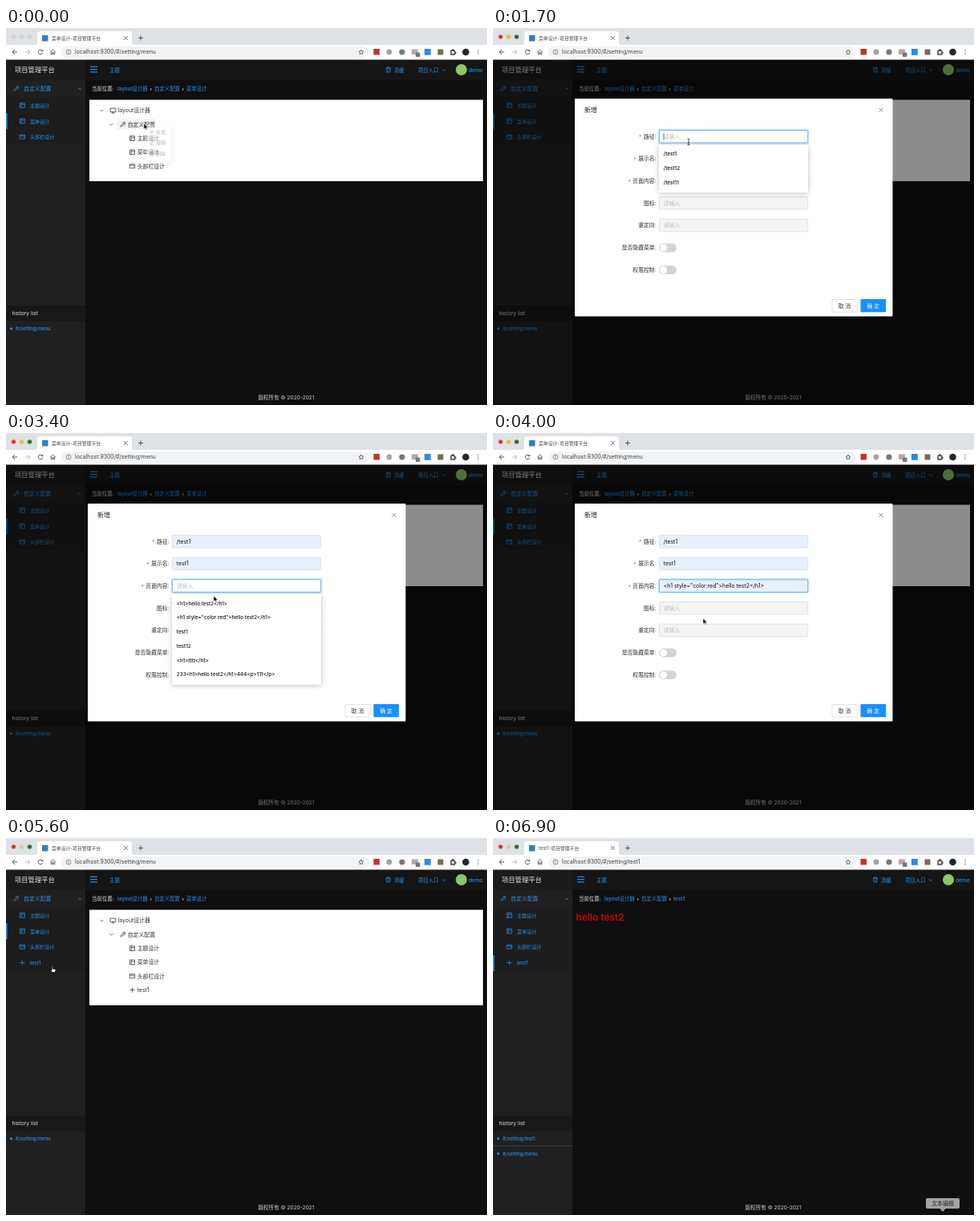
Write an HTML page that moves like this. It is 600 px wide and 470 px high and loops after 7 s.

```html
<!DOCTYPE html>
<html lang="zh">
<head>
<meta charset="utf-8">
<title>菜单设计</title>
<style>
  html, body { margin: 0; width: 100%; height: 100%; overflow: hidden; background: #0f0f0f; }
  svg { display: block; width: 600px; height: 470px; font-family: Inter, "Noto Sans CJK SC", "Noto Sans CJK", sans-serif; }
  text { white-space: pre; }
  .pop { filter: drop-shadow(0 1.5px 3px rgba(0, 0, 0, .25)); }
  .menu { filter: drop-shadow(2px 3px 5px rgba(0, 0, 0, .16)); }
</style>
</head>
<body>
<svg id="stage" viewBox="0 0 600 470"></svg>
<script>
const LOOP = 7000, STEP = 100;
const BLUE = '#2a90e8', INK = '#333', PALE = '#e4e4e4';

// [time, x, y, shape]
const MOVES = [
  [0, 172, 119, 'arrow'], [400, 172, 119, 'arrow'], [800, 195, 131, 'hand'], [1200, 195, 131, 'arrow'],
  [1500, 244, 142, 'beam'], [1800, 244, 142, 'arrow'], [2000, 232, 159, 'arrow'], [2100, 232, 159, 'arrow'],
  [2400, 240, 164, 'beam'], [2600, 240, 164, 'arrow'], [2800, 230, 187, 'arrow'], [2900, 230, 187, 'arrow'],
  [3100, 259, 192, 'beam'], [3200, 259, 192, 'arrow'], [3400, 259, 203, 'arrow'], [3800, 262, 231, 'arrow'],
  [4000, 262, 231, 'arrow'], [4600, 475, 346, 'hand'], [5000, 475, 346, 'arrow'], [5500, 58, 160, 'hand'],
  [6400, 58, 160, 'arrow'], [6900, 561, 476, 'arrow']
];

const FIELDS = [
  { label: '路径', y: 135.3, need: 1, focus: [1500, 2400], open: [1600, 2100], value: '/test1',
    list: ['/test1', '/test12', '/test11'], pick: 0, hover: 2000 },
  { label: '展示名', y: 163, need: 1, focus: [2400, 3100], open: [2500, 2900], value: 'test1',
    list: ['test1', 'test12', 'test11'], pick: 0, hover: 2700 },
  { label: '页面内容', y: 190.6, need: 1, focus: [3100, 5300], open: [3200, 4000], value: '<h1 style="color:red">hello test2</h1>',
    list: ['<h1>hello test2</h1>', '<h1 style="color:red">hello test2</h1>', 'test1', 'test12',
      '<h1>tttt</h1>', '233<h1>hello test2</h1>444<p>111</p>'], pick: 1, hover: 3700 },
  { label: '图标', y: 218.3 },
  { label: '重定向', y: 246 },
  { label: '是否隐藏菜单', y: 274, toggle: 1 },
  { label: '权限控制', y: 301.7, toggle: 1 }
];

const ICONS = {
  plus: 'M-3 0H3M0-3V3',
  cross: 'M-2.4-2.4L2.4 2.4M2.4-2.4L-2.4 2.4',
  down: 'M-2-1L0 1L2-1',
  up: 'M-2 1L0-1L2 1',
  monitor: 'M-3.4-2.8H3.4V1.6H-3.4ZM0 1.6V3M-2 3H2',
  wrench: 'M-3 2.2L.2-1A2 2 0 0 1 2.6-3L1.3-1.6L2-.8L3.2-2A2 2 0 0 1 1 .6L-2.2 3Z',
  layout: 'M-3-2.9H3V2.9H-3ZM-1.2-2.9V2.9M-1.2-.9H3',
  card: 'M-3.2-2.5H3.2V2.5H-3.2ZM-3.2-1H3.2M1 .8H2.2',
  pencil: 'M-2.5 1.6L-2.1-.2L1.4-3L2.6-1.6L-.8 1.4ZM-3 3H3',
  trash: 'M-3-2H3M-1-2V-3H1V-2M-2.3-2L-2 3H2L2.3-2M0-.6V1.6',
  back: 'M3 0H-3M0-3L-3 0L0 3',
  forward: 'M-3 0H3M0-3L3 0L0 3',
  reload: 'M2.4-1.6A2.8 2.8 0 1 0 2.8.8M2.8-3V-1.2H1',
  home: 'M-3.2 0L0-3L3.2 0M-2.2-.6V2.8H-.7V.6H.7V2.8H2.2V-.6',
  star: 'M0-3L.9-1L3-.8L1.4.6L1.9 2.8L0 1.7L-1.9 2.8L-1.4.6L-3-.8L-.9-1Z',
  puzzle: 'M-2.6-1.6H-.8A1 1 0 1 1 .8-1.6H2V0A1 1 0 1 1 2 1.6V3H-2.6V1.8A1 1 0 0 0-2.6 0Z'
};

const CURSORS = {
  arrow: '<path d="M0 0V7.2L1.7 5.7L2.9 8.3L4 7.8L2.9 5.3H5.2Z" fill="#000" stroke="#fff" stroke-width=".6"/>',
  hand: '<path d="M-.8 0Q0-.8.7 0V3L3.4 3.4Q4.2 3.7 4 4.8L3.4 7.6H-.3L-2.4 4.6Q-2.3 3.5-.8 4.6Z" fill="#fff" stroke="#000" stroke-width=".8"/>',
  beam: '<path d="M-1.5-4Q0-4 0-3Q0-4 1.5-4M0-3V3M-1.5 4Q0 4 0 3Q0 4 1.5 4M-.8.8H.8" fill="none" stroke="#222" stroke-width=".8"/>'
};

const clamp = v => Math.max(0, Math.min(1, v));
const within = (t, [a, b]) => t >= a && t < b;
const esc = s => s.replace(/&/g, '&amp;').replace(/</g, '&lt;');

const rect = (x, y, w, h, fill, more = '') =>
  `<rect x="${x}" y="${y}" width="${w}" height="${h}" fill="${fill}" ${more}/>`;
const dot = (x, y, r, fill, more = '') => `<circle cx="${x}" cy="${y}" r="${r}" fill="${fill}" ${more}/>`;
const text = (x, y, size, str, fill = INK, more = '') =>
  `<text x="${x}" y="${(y + size * .36).toFixed(2)}" font-size="${size}" fill="${fill}" ${more}>${esc(str)}</text>`;
const icon = (name, x, y, color = INK, width = .75) =>
  `<path transform="translate(${x} ${y})" d="${ICONS[name]}" fill="none" stroke="${color}" stroke-width="${width}"/>`;
const MEDIUM = 'font-weight="500"';

function browser(t, s) {
  const lights = s.idle ? ['#d2d4d7', '#d2d4d7', '#d2d4d7'] : ['#ee4d49', s.dim > .2 ? '#f2bd30' : '#dfc8a4', '#2f8a35'];
  let out = rect(0, 0, 600, 21, '#dee1e6') + rect(0, 21, 600, 18.5, '#fff');
  lights.forEach((c, i) => {
    out += dot(9.5 + i * 10, 11, 2.8, c);
    if (!s.idle && i !== 1) out += dot(9.5 + i * 10, 11, 1, '#5b1f16');
  });
  out += '<path d="M36 21Q39 21 39 18V7.5Q39 4 42 4H154Q157 4 157 7.5V18Q157 21 160 21Z" fill="#fff"/>'
    + rect(45, 9, 7.5, 7.5, '#2f7fc4')
    + text(57, 12.7, 5.85, (s.test ? 'test1' : '菜单设计') + '-项目管理平台', '#45484c')
    + icon('cross', 149.5, 12.5, '#444', .8) + icon('plus', 168, 12.5, '#444', .9)
    + icon('back', 11, 30, '#555', 1) + icon('forward', 27, 30, '#bbb', 1)
    + icon('reload', 43, 30, '#555', 1) + icon('home', 58.5, 30, '#555', .9)
    + rect(69, 23, 384, 14, '#f1f3f4', 'rx="7"')
    + dot(78, 30, 3, 'none', 'stroke="#666" stroke-width=".7"') + rect(77.6, 29.4, .8, 2.2, '#666') + rect(77.6, 28, .8, .8, '#666')
    + text(86, 30, 6.9, 'localhost:9300/#/setting/' + (s.test ? 'test1' : 'menu'), '#3c4043')
    + icon('star', 443, 30, '#555', .8)
    + rect(458.5, 26, 7.5, 7.5, '#c8322b') + dot(478, 30, 3.4, '#9aa5a5') + dot(494, 30, 3.6, '#777')
    + rect(506, 26.5, 8, 6.5, '#b9a7a6') + rect(511, 30.5, 5.5, 5.5, '#777', 'rx="1"')
    + rect(522, 26, 7.8, 7.8, '#2b8ce0') + rect(538.5, 26.5, 7, 7, '#776b55')
    + icon('puzzle', 557.5, 30, '#444', 1.3) + dot(573.5, 30, 4.3, '#20262b');
  for (const y of [27.5, 30, 32.5]) out += dot(589, y, .7, '#666');
  return out;
}

function sidebar(t, s) {
  const items = [['layout', '主题设计'], ['layout', '菜单设计'], ['card', '头部栏设计']];
  if (s.added) items.push(['plus', 'test1']);
  let out = rect(0, 39.5, 99, 431, '#202020') + rect(0, 39.5, 99, 25.5, '#1b1b1b')
    + text(11, 52, 8.3, '项目管理平台', PALE, MEDIUM)
    + icon('wrench', 12.5, 75.5, BLUE) + text(22, 75.5, 6.9, '自定义配置', BLUE) + icon('up', 92, 76, BLUE, .8)
    + rect(0, 86, 99, items.length * 19.8, '#1d1d1d');
  items.forEach(([ic, name], i) => {
    const y = 96.8 + i * 19.7;
    out += icon(ic, 20.3, y - .5, BLUE) + text(30, y, 6.1, name, BLUE, MEDIUM);
  });
  out += rect(0, s.test ? 146 : 106.5, 1.6, 20, '#1890ff')
    + rect(0, 346, 99, 19.5, '#181818') + text(7.5, 356, 6.7, 'history list', PALE);
  const visited = s.test ? ['test1', 'menu'] : ['menu'];
  visited.forEach((p, i) => {
    const y = 374.7 + i * 18.8;
    out += dot(6.5, y, 1.5, BLUE) + text(12, y, 5.95, '#/setting/' + p, BLUE, MEDIUM);
  });
  if (s.test) out += '<path d="M0 383.8H99" stroke="#777" stroke-width=".7" stroke-dasharray="1 1"/>';
  return out;
}

function header(s) {
  let out = rect(99, 39.5, 501, 25.5, '#151515');
  for (const y of [48.3, 51.6, 54.9]) out += rect(105, y - .6, 9, 1.2, BLUE);
  out += text(129, 52.3, 6.4, '主题', BLUE, MEDIUM)
    + icon('trash', 477, 52, BLUE, .8) + text(484, 52.3, 6.3, '清缓', BLUE, MEDIUM)
    + text(514, 52.3, 6.4, '项目入口', BLUE, MEDIUM) + icon('down', 546, 52.5, BLUE, .8)
    + dot(568, 52, 7, '#8dc766') + text(577, 52.3, 6.6, 'demo', BLUE, MEDIUM)
    + text(107, 75.5, 6.4, '当前位置:', PALE, MEDIUM);
  [[139, 'layout设计器'], [185, '自定义配置'], [225, s.test ? 'test1' : '菜单设计']].forEach(([x, name], i) => {
    out += text(x, 75.5, 6.4, name, BLUE, MEDIUM);
    if (i) out += text(x - 5.5, 75.2, 6.4, '›', PALE, MEDIUM);
  });
  return out;
}

function tree(t, s) {
  const rows = [[0, 'monitor', 'layout设计器'], [1, 'wrench', '自定义配置'], [2, 'layout', '主题设计'],
    [2, 'layout', '菜单设计'], [2, 'card', '头部栏设计']];
  if (s.added) rows.push([2, 'plus', 'test1']);
  let out = rect(104, 89.5, 491, s.added ? 119 : 101.5, '#fff');
  if (t < 600) out += rect(138, 113.5, 48.5, 13, '#f3f3f3');
  rows.forEach(([depth, ic, name], i) => {
    const x = 133.5 + depth * 12, y = 103 + i * 17.3;
    if (depth < 2) out += icon('down', x - 14, y, '#555', .8);
    out += icon(ic, x, y) + text(x + 6.2, y, 6.9, name);
  });
  return out;
}

function contextMenu(t) {
  if (t >= 1300) return '';
  const grow = clamp(t / 200), k = .88 + .12 * grow;
  const alpha = t < 1200 ? .35 + .65 * grow : .4;
  let out = rect(171.5, 120.5, 36.5, 52.5, '#fff', 'rx="1"');
  [['plus', '新增'], ['pencil', '编辑'], ['trash', '删除']].forEach(([ic, name], i) => {
    out += icon(ic, 181, 130.7 + i * 15.7) + text(186.7, 130.7 + i * 15.7, 6.9, name);
  });
  return `<g class="menu" opacity="${alpha}" transform="translate(189.5 120) scale(${k}) translate(-189.5 -120)">${out}</g>`;
}

function dropdown(f, t) {
  const top = f.y + 10.7;
  let out = rect(207, top, 186, f.list.length * 17.75 + 6, '#fff', 'class="pop" rx="1"');
  f.list.forEach((str, i) => {
    const y = f.y + 21.7 + i * 17.75;
    if (i === f.pick && t >= f.hover) out += rect(207, y - 8.8, 186, 17.6, '#eee');
    out += text(212.8, y, 6.35, str, '#111', MEDIUM);
  });
  return out;
}

function field(f, t) {
  let out = text(203.5, f.y, 6.8, f.label + ':', '#2b2b2b', 'text-anchor="end"');
  if (f.need) out += text(199 - f.label.length * 6.8, f.y + .6, 6.8, '*', '#ff4d4f', 'text-anchor="end"');
  if (f.toggle) return out + rect(207, f.y - 5.4, 22, 10.8, '#d3d4d8', 'rx="5.4"') + dot(212.6, f.y, 4.5, '#fff');

  const filled = f.value && t >= f.open[1], focused = f.focus && within(t, f.focus);
  if (focused) out += rect(206.5, f.y - 8.5, 187, 17, 'none', 'rx="1.5" stroke="#1890ff" stroke-opacity=".2" stroke-width="2"');
  out += rect(207.4, f.y - 7.8, 185.3, 15.6, filled ? '#e8f0fe' : f.need ? '#fff' : '#f4f4f5',
    `rx="1" stroke="${focused ? '#40a9ff' : '#d9dce2'}" stroke-width=".8"`);
  out += text(212.8, f.y, 6.9, filled ? f.value : '请输入', filled ? '#111' : '#bfbfbf');
  if (focused && !filled && t % 1000 >= 500) out += rect(212.6, f.y - 4, .7, 8, '#222');
  return out;
}

function modal(t) {
  const shown = t < 3000 ? clamp((t - 1100) / 300) : 1 - clamp((t - 4900) / 300);
  if (!shown) return '';
  const k = Math.sqrt(1 - (1 - shown) ** 2), scale = .2 + .8 * k;
  let out = rect(102, 88, 396.5, 271.5, '#fff', 'rx="1"')
    + text(114, 102, 8, '新增', '#222', MEDIUM) + icon('cross', 484, 102.3, '#777', .8)
    + FIELDS.map(f => field(f, t)).join('')
    + rect(423, 338.5, 31.3, 15.5, '#fff', 'rx="1" stroke="#d9d9d9" stroke-width=".8"')
    + text(438.6, 346.3, 6.8, '取 消', INK, 'text-anchor="middle"')
    + rect(458.5, 338, 31.7, 16.2, t >= 4600 ? '#369bf6' : '#1890ff', 'rx="1"')
    + text(474.3, 346.3, 6.8, '确 定', '#fff', 'text-anchor="middle" font-weight="500"');
  const open = FIELDS.find(f => f.open && within(t, f.open));
  if (open) out += dropdown(open, t);
  return `<g opacity="${k}" transform="translate(195 131) scale(${scale}) translate(-195 -131)">${out}</g>`;
}

function cursor(t) {
  let i = MOVES.length - 1;
  while (MOVES[i][0] > t) i--;
  const a = MOVES[i], b = MOVES[i + 1] || a;
  const p = b === a ? 0 : (t - a[0]) / (b[0] - a[0]), e = p * p * (3 - 2 * p);
  const x = a[1] + (b[1] - a[1]) * e, y = a[2] + (b[2] - a[2]) * e;
  return `<g transform="translate(${x} ${y})">${CURSORS[a[3]]}</g>`;
}

function dockLabel() {
  return rect(540, 449, 42, 13, '#a3a3a3', 'rx="2"') + '<path d="M557.5 462H564.5L561 466Z" fill="#a3a3a3"/>'
    + text(561, 455.5, 6.9, '文本编辑', '#222', 'text-anchor="middle"');
}

function scene(t) {
  const s = {
    idle: t < 100,
    added: t >= 5000,
    test: t >= 5900,
    dim: .45 * (t < 3000 ? clamp((t - 1075) / 300) : 1 - clamp((t - 4900) / 300))
  };
  return rect(0, 0, 600, 470, '#0f0f0f') + sidebar(t, s) + header(s)
    + (s.test ? text(103.5, 99, 12.1, 'hello test2', '#e60000', MEDIUM) : tree(t, s))
    + text(349.5, 460.3, 6.6, '版权所有 © 2020-2021', '#d4d4d4', 'text-anchor="middle"')
    + rect(0, 39.5, 600, 431, '#000', `opacity="${s.dim}"`)
    + browser(t, s) + contextMenu(t) + modal(t)
    + (t >= 6800 ? dockLabel() : '') + cursor(t);
}

const stage = document.getElementById('stage');
const start = performance.now();
let last = -1;
function tick() {
  const t = Math.floor((performance.now() - start) % LOOP / STEP) * STEP;
  if (t !== last) stage.innerHTML = scene(last = t);
  requestAnimationFrame(tick);
}
tick();
</script>
</body>
</html>
```
